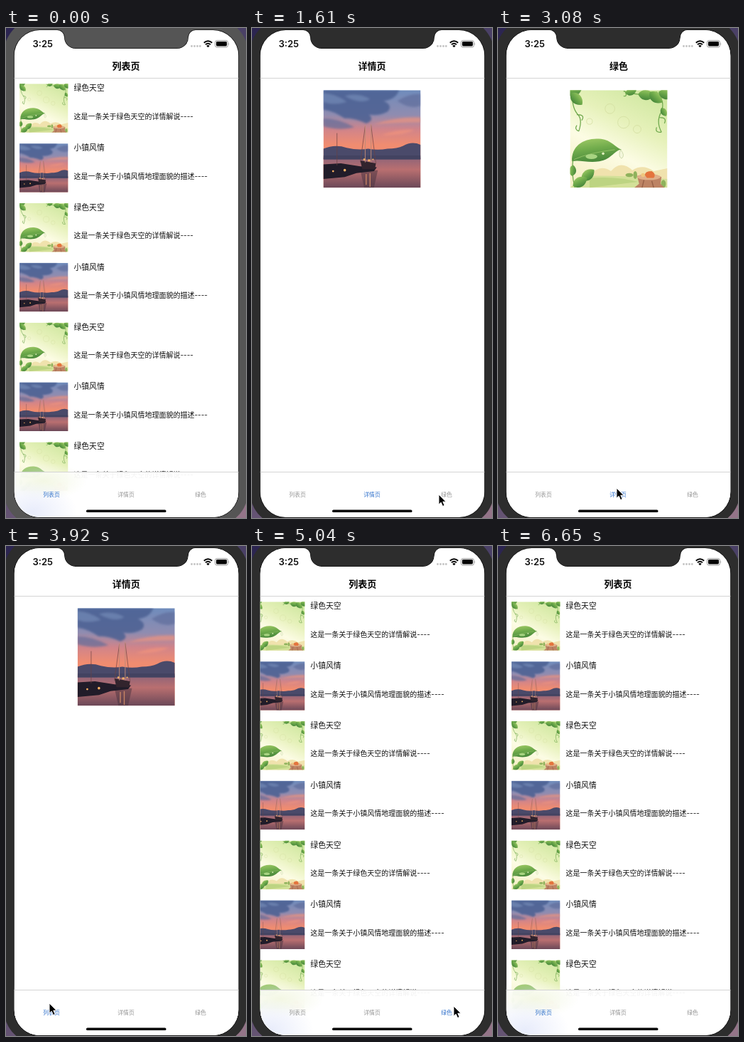
Animation of 338 by 688 pixels, one loop 6.72 s. Source, as an HTML page:

```html
<!DOCTYPE html>
<html lang="zh-CN">
<head>
<meta charset="utf-8">
<style>
html, body { margin: 0; width: 100%; height: 100%; overflow: hidden; background: #2b2546; }
svg { display: block; width: 338px; height: 688px; }
text { font-family: Inter, "Noto Sans CJK SC", "Noto Sans CJK", sans-serif; fill: #111; }
.title { font-size: 13px; font-weight: 600; text-anchor: middle; fill: #000; }
.name { font-size: 10.8px; }
.desc { font-size: 10px; }
.tab { font-size: 7.8px; text-anchor: middle; }
</style>
</head>
<body>
<svg viewBox="0 0 338 688">
  <defs>
    <clipPath id="screen"><path id="outline" d="M47.6 3H72A10 10 0 0 1 82 13A16 16 0 0 0 98 29H241A16 16 0 0 0 257 13A10 10 0 0 1 267 3H291.4A36 36 0 0 1 327.4 39V651A36 36 0 0 1 291.4 687H47.6A36 36 0 0 1 11.6 651V39A36 36 0 0 1 47.6 3Z"/></clipPath>
    <linearGradient id="desk" x2=".7" y2="1">
      <stop offset="0" stop-color="#2b2450"/><stop offset=".5" stop-color="#4c4268"/><stop offset="1" stop-color="#937488"/>
    </linearGradient>
    <linearGradient id="dusk" x2="0" y2="1">
      <stop offset="0" stop-color="#6f8cbc"/><stop offset=".25" stop-color="#8f8cb0"/>
      <stop offset=".4" stop-color="#d0848a"/><stop offset=".56" stop-color="#f08c70"/>
    </linearGradient>
    <linearGradient id="water" x2="0" y2="1">
      <stop offset="0" stop-color="#8f6478"/><stop offset=".4" stop-color="#b96f70"/><stop offset="1" stop-color="#6b4858"/>
    </linearGradient>
    <linearGradient id="meadow" x1=".8" y1="0" x2=".3" y2="1">
      <stop offset="0" stop-color="#cfe7a0"/><stop offset=".35" stop-color="#e6f1ba"/>
      <stop offset=".65" stop-color="#fcfce4"/><stop offset="1" stop-color="#f6f0c8"/>
    </linearGradient>
    <linearGradient id="blade" x2=".3" y2="1">
      <stop offset="0" stop-color="#a3cc68"/><stop offset=".5" stop-color="#71ac4c"/><stop offset="1" stop-color="#4a8a3c"/>
    </linearGradient>
    <radialGradient id="lavender"><stop offset="0" stop-color="#e8ecfb"/><stop offset="1" stop-color="#e8ecfb" stop-opacity="0"/></radialGradient>
    <radialGradient id="mint"><stop offset="0" stop-color="#f3f7e4"/><stop offset="1" stop-color="#f3f7e4" stop-opacity="0"/></radialGradient>
    <filter id="soft"><feGaussianBlur stdDeviation="1.3"/></filter>
    <path id="leaf" d="M0 0C2-8 11-9 16-4C13 4 5 6 0 0Z" fill="url(#blade)"/>

    <symbol id="harbor" viewBox="0 0 100 100">
      <rect width="100" height="100" fill="url(#dusk)"/>
      <g filter="url(#soft)">
        <path d="M0 0H78Q74 10 62 11Q72 16 66 22Q56 27 47 25Q53 31 44 34Q30 28 22 29Q10 21 0 20Z" fill="#4b6092" opacity=".85"/>
        <path d="M76 11Q88 3 100 4V16Q88 20 76 11ZM0 29Q16 29 32 38Q17 42 0 37Z" fill="#5c6a9a" opacity=".65"/>
        <path d="M0 3Q14 4 24 12Q10 16 0 12ZM22 6Q35 2 48 9Q38 15 22 6Z" fill="#8097c2" opacity=".5"/>
        <path d="M52 35Q75 27 100 28V33Q75 33 52 35ZM60 46Q80 39 94 41Q78 47 60 46Z" fill="#f5947c" opacity=".6"/>
      </g>
      <rect y="69" width="100" height="31" fill="url(#water)"/>
      <path d="M0 60Q12 55 24 59Q36 62 46 60Q56 62 66 60Q76 60 82 57Q91 52 100 56V71H0Z" fill="#4a4a6a"/>
      <path d="M0 67H100V71H0Z" fill="#40405c" opacity=".6"/>
      <path d="M38 82H56L52 100H42Z" fill="#48323f" opacity=".5"/>
      <path d="M0 76L18 75L38 78L55 79L52 83L34 85L22 89L0 91Z" fill="#211c29"/>
      <path d="M38 72L54 75L53 81H40Z" fill="#32242d"/>
      <path d="M14 44V77M43 37L38 74M49 36L54 75" stroke="#6c4242" stroke-width=".5" fill="none"/>
      <path d="M43 36V74M49 35V74" stroke="#c08a78" stroke-width=".7"/>
      <g fill="#ffb564"><circle cx="42" cy="71" r="1"/><circle cx="47" cy="72" r="1.2"/><circle cx="51" cy="71" r=".8"/><circle cx="22" cy="82" r="1.3"/><circle cx="10" cy="83" r="1"/></g>
      <path d="M44 86V97M48 85V99" stroke="#f0a06d" opacity=".7"/>
    </symbol>

    <symbol id="garden" viewBox="0 0 100 100">
      <rect width="100" height="100" fill="url(#meadow)"/>
      <g fill="none" stroke="#d3dda0" stroke-width=".7" opacity=".8">
        <circle cx="41" cy="19" r="5"/><circle cx="55" cy="33" r="6"/><circle cx="20" cy="32" r="3"/><circle cx="69" cy="40" r="4"/><circle cx="46" cy="96" r="4"/>
      </g>
      <path d="M20 88Q30 75 42 83Q52 71 64 82Q75 75 86 83L100 80V100H15Z" fill="#f0e2ad"/>
      <path d="M15 88Q50 87 100 91V100H0Z" fill="#d3e098"/>
      <path d="M20 90Q50 88 70 94L20 100Z" fill="#bdd482"/>
      <path d="M2 73C1 56 16 48 32 50C42 51 47 59 53 61C46 61 43 71 30 73C18 75 10 71 2 73Z" fill="url(#blade)"/>
      <path d="M4 71Q20 64 46 61" fill="none" stroke="#9cc96c" stroke-width=".6"/>
      <ellipse cx="22" cy="68" rx="6" ry="2.5" fill="#a8d482"/><circle cx="34" cy="65" r="1.3" fill="#dff0bd"/>
      <path d="M52 61Q57 67 53 70Q49 68 52 61Z" fill="#f4f7dc" stroke="#c6d4a4" stroke-width=".6"/>
      <g fill="none" stroke="#6ca64a" stroke-width=".9">
        <path d="M3 72Q1 85 5 100M5 97Q16 94 20 86"/>
        <path d="M3 2Q1 17 8 25Q13 30 9 42M7 25Q16 25 12 31M9 42Q4 40 7 36M55 1Q72 7 89 2Q98 11 94 22Q88 32 94 43M92 28Q100 28 97 34M94 43Q87 44 89 38M57 2Q59 7 55 6"/>
      </g>
      <use href="#leaf" transform="translate(-4 3)"/><use href="#leaf" transform="translate(1 3) rotate(60)"/>
      <use href="#leaf" transform="translate(57 3) scale(.7)"/><use href="#leaf" transform="translate(70 4) rotate(20)"/>
      <use href="#leaf" transform="translate(82 2) rotate(55)"/><use href="#leaf" transform="translate(91 2) rotate(30)"/>
      <use href="#leaf" transform="translate(94 18) rotate(75) scale(.6)"/>
      <use href="#leaf" transform="translate(2 88) rotate(-70) scale(.7)"/><use href="#leaf" transform="translate(12 92) rotate(-25)"/>
      <use href="#leaf" transform="translate(3 98) rotate(-15)"/>
      <g fill="#8fb25c"><ellipse cx="61" cy="87" rx="4" ry="2"/><ellipse cx="67" cy="87" rx="2" ry="4"/><ellipse cx="96" cy="96" rx="2.5" ry="4"/></g>
      <path d="M69 88Q82 83 94 89L93 96L97 100H66L71 96Z" fill="#bd8364"/>
      <ellipse cx="81" cy="89" rx="12" ry="3" fill="#dfb18a"/>
      <path d="M76 92L74 100M84 93L86 100" stroke="#966047"/>
      <path d="M77 87Q77 83 84 83Q89 86 86 90H79Z" fill="#e4743d"/><circle cx="75" cy="87" r="2" fill="#efc77f"/>
    </symbol>
  </defs>

  <rect width="338" height="688" fill="url(#desk)"/>
  <rect id="bezel" x="-3" y="-14" width="344" height="714" rx="50"/>
  <use href="#outline" fill="#fff" stroke="#111" stroke-width="1.4"/>
  <g clip-path="url(#screen)">
    <g id="pages"></g>
    <path d="M11 70.5H328M11 623.5H328" stroke="#d4d4d4"/>
  </g>
  <g id="tabs"></g>
  <rect x="113" y="676.6" width="112.5" height="3.5" rx="1.7"/>

  <text x="37.5" y="27" font-size="13" font-weight="600">3:25</text>
  <g fill="#c4c4c4"><circle cx="261.5" cy="25.5" r="1.4"/><circle cx="265.5" cy="25.5" r="1.4"/><circle cx="269.5" cy="25.5" r="1.4"/><circle cx="273.3" cy="25.5" r="1.4"/></g>
  <g fill="none" stroke="#000" stroke-width="2"><path d="M278.8 20.8Q284.5 15.8 290.2 20.8M281 23.3Q284.5 20.3 288 23.3"/></g>
  <path d="M282.3 24.9Q284.5 23.2 286.7 24.9L284.5 27.2Z"/>
  <rect x="294.5" y="17.6" width="18" height="9.4" rx="2.6" fill="none" stroke="#999"/>
  <rect x="296" y="19.1" width="15" height="6.4" rx="1.4"/>
  <path d="M313.6 20.7Q315.4 22.3 313.6 23.9Z" fill="#999"/>

  <path id="cursor" d="M0 0V14.2L3.2 11.2L5.6 16.6L8.2 15.4L5.8 10.2H10.2Z" stroke="#fff" stroke-width="1"/>
</svg>
<script>
const LOOP = 6720, STEP = 70, SLIDE = 500, WIDTH = 316;
const $ = id => document.getElementById(id);
const names = ["列表页", "详情页", "绿色"];
const LIST = 0, DETAIL = 1, GREEN = 2;

const taps = [
  { at: 900, to: DETAIL }, { at: 1960, to: GREEN }, { at: 3060, to: DETAIL },
  { at: 3910, to: LIST }, { at: 4968, to: GREEN }, { at: 5990, to: LIST }
];
// Pointer stops: time, x, y
const stops = [
  [250, 215, 692], [750, 170, 648], [1250, 170, 648], [1750, 285, 656.6], [2150, 285, 656.6],
  [2850, 167, 646], [3150, 167, 646], [3780, 61, 642], [4150, 61, 642], [4850, 284, 646],
  [5140, 284, 646], [5850, 65, 637], [6120, 65, 637], [6480, 72, 692]
];

const picture = (id, x, y, size) => `<use href="#${id}" x="${x}" y="${y}" width="${size}" height="${size}"/>`;

function listRow(i) {
  const y = 78.3 + i * 83.85;
  const [id, name, desc] = i % 2
    ? ["harbor", "小镇风情", "这是一条关于小镇风情地理面貌的描述----"]
    : ["garden", "绿色天空", "这是一条关于绿色天空的详情解说----"];
  return picture(id, 19, y, 68.5) +
    `<text class="name" x="95.5" y="${y + 9.8}">${name}</text><text class="desc" x="95.5" y="${y + 49.4}">${desc}</text>`;
}

const bar = opacity => `<rect x="11.5" y="623" width="316" height="65" fill="#fff" opacity="${opacity}"/>`;
const listBody = [0, 1, 2, 3, 4, 5, 6].map(listRow).join("") + bar(.95) +
  `<ellipse cx="52" cy="636" rx="62" ry="26" fill="url(#mint)"/>
   <ellipse cx="38" cy="680" rx="62" ry="44" fill="url(#lavender)"/>`;
const bodies = [listBody, picture("harbor", 100.5, 87.3, 137), picture("garden", 100.5, 87.3, 137)];

$("pages").innerHTML = bodies.map((body, i) =>
  `<g><rect x="11.5" width="316" height="688" fill="#fff"/><text class="title" x="169" y="57.8">${names[i]}</text>${body}</g>`).join("");
$("tabs").innerHTML = names.map((name, i) => `<text class="tab" x="${64 + i * 105}" y="658">${name}</text>`).join("");
const pages = [...$("pages").children], tabs = [...$("tabs").children];

// Ease-in-out, cubic-bezier(.42, 0, .58, 1)
function ease(x) {
  let lo = 0, hi = 1;
  for (let i = 0; i < 24; i++) {
    const s = (lo + hi) / 2, r = 1 - s;
    if (1.26 * s * r * r + 1.74 * s * s * r + s ** 3 < x) lo = s; else hi = s;
  }
  return lo * lo * (3 - 2 * lo);
}

function drawPages(t) {
  const n = taps.findLastIndex(tap => tap.at <= t);
  const current = n < 0 ? LIST : taps[n].to;
  const previous = n < 1 ? LIST : taps[n - 1].to;
  const progress = n < 0 ? 1 : Math.min(1, (t - taps[n].at) / SLIDE);
  const sliding = progress < 1;
  const dx = sliding ? Math.sign(previous - current) * WIDTH * ease(progress) : 0;
  pages.forEach((page, i) => {
    const leaving = sliding && i === previous;
    page.style.display = leaving || i === current ? "" : "none";
    page.setAttribute("transform", `translate(${leaving ? dx : 0})`);
  });
  // The leaving page slides away above the new one
  const top = pages[sliding ? previous : current];
  if (top.nextSibling) $("pages").append(top);
  tabs.forEach((tab, i) => tab.style.fill = i === current ? "#2f70cb" : "#929292");
}

function drawCursor(t) {
  const n = stops.findIndex(stop => stop[0] > t);
  $("cursor").style.display = n > 0 ? "" : "none";
  if (n < 1) return;
  const [t0, x0, y0] = stops[n - 1], [t1, x1, y1] = stops[n];
  const u = (t - t0) / (t1 - t0), p = u * u * (3 - 2 * u);
  $("cursor").setAttribute("transform", `translate(${x0 + (x1 - x0) * p} ${y0 + (y1 - y0) * p})`);
}

function draw(time) {
  const t = Math.floor((time % LOOP) / STEP) * STEP;
  $("bezel").setAttribute("fill", t < 420 ? "#555" : "#2d2d2d");
  drawPages(t);
  drawCursor(t);
}

const start = performance.now();
function frame() {
  draw(performance.now() - start);
  requestAnimationFrame(frame);
}
frame();
</script>
</body>
</html>
```
